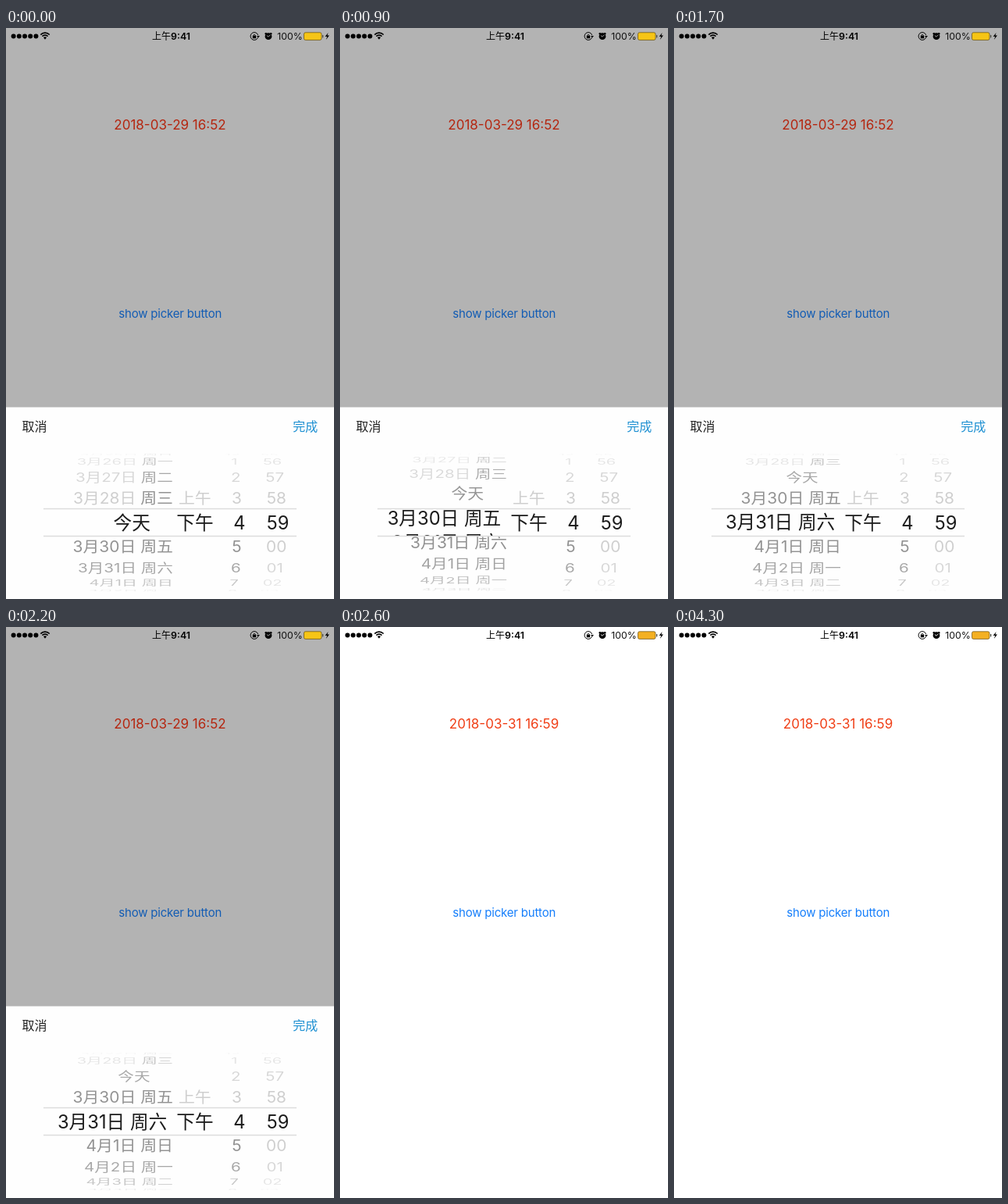
An HTML page with a canvas that plays this animation: 420x731 px, repeating every 4800 ms.

```html
<!DOCTYPE html>
<html lang="zh-CN">
<head>
<meta charset="utf-8">
<title>Date picker</title>
<style>
html, body { margin: 0; width: 100%; height: 100%; overflow: hidden; background: #fff; }
canvas { display: block; }
</style>
</head>
<body>
<canvas id="stage" width="420" height="731"></canvas>
<script>
const c = document.getElementById('stage').getContext('2d');
const W = 420, H = 731, LOOP = 4800;
const FONT = 'Inter, "Noto Sans CJK SC", "Noto Sans CJK", sans-serif';
const RADIUS = 87.3, STEP = 0.363, MID = 633, SHEET = 485.5;
const clamp = v => Math.max(0, Math.min(1, v));

function text(str, x, y, size, color, align = 'center', weight = 400, spacing = 0) {
  c.font = `${weight} ${size}px ${FONT}`;
  c.letterSpacing = spacing + 'px';
  c.textAlign = align;
  c.fillStyle = color;
  c.fillText(str, x, y);
  return c.measureText(str).width;
}

function disc(x, y, r, color = '#000') {
  c.fillStyle = color;
  c.beginPath();
  c.arc(x, y, r, 0, 7);
  c.fill();
}

function arc(x, y, r, from, to, width, color = '#000') {
  c.strokeStyle = color;
  c.lineWidth = width;
  c.beginPath();
  c.arc(x, y, r, from, to);
  c.stroke();
}

function statusBar(dimmed) {
  for (let i = 0; i < 5; i++) disc(9.6 + i * 7.2, 10.5, 3);

  // Wi-Fi
  for (const r of [8, 5]) arc(50, 14.2, r, -2.36, -0.78, 1.7);
  c.fillStyle = '#000';
  c.beginPath();
  c.moveTo(50, 14.8);
  c.arc(50, 14.2, 2.8, -2.36, -0.78);
  c.fill();

  const w = text('上午', 187, 15, 12, '#000', 'left', 500);
  text('9:41', 187 + w, 15, 12.4, '#000', 'left', 600);

  // Rotation lock
  arc(318, 10.5, 4.9, 0.35, 6, 1);
  c.fillStyle = '#000';
  c.fillRect(315.8, 10, 4.4, 3.3);
  arc(318, 10, 1.4, Math.PI, 0, 0.9);
  c.beginPath();
  c.moveTo(321, 10);
  c.lineTo(325, 10);
  c.lineTo(323, 12.4);
  c.fill();

  // Alarm
  disc(336, 10.7, 4.4);
  disc(332.8, 7.2, 1.3);
  disc(339.2, 7.2, 1.3);
  c.strokeStyle = dimmed ? '#b3b3b3' : '#fff';
  c.lineWidth = 0.9;
  c.beginPath();
  c.moveTo(333.8, 9.5);
  c.lineTo(336, 11.3);
  c.lineTo(338.6, 8.6);
  c.stroke();

  text('100%', 347.3, 15, 12.3, '#111', 'left');

  // Battery
  c.fillStyle = dimmed ? '#f6c516' : '#f4b022';
  c.strokeStyle = 'rgba(70,50,0,.65)';
  c.lineWidth = 0.9;
  c.beginPath();
  c.roundRect(381.5, 5.8, 22.5, 9.6, 2);
  c.fill();
  c.stroke();
  c.fillStyle = '#554';
  c.fillRect(405, 9, 1.3, 3.4);
  c.fillStyle = '#000';
  c.beginPath();
  for (const [x, y] of [[412.6, 6], [408.6, 11], [411.2, 11], [409.8, 15], [414, 9.6], [411.4, 9.6]]) c.lineTo(x, y);
  c.fill();
}

// Calls draw(index, alpha) for each row on the visible half of a drum.
function drum(pos, lens, draw) {
  for (let i = Math.ceil(pos - 4.2); i <= pos + 4.2; i++) {
    const a = (i - pos) * STEP, depth = Math.cos(a);
    if (depth < 0.04) continue;
    const k = lens ? 1 : 1 - 0.08 * (1 - depth);
    c.save();
    c.translate(210, MID + RADIUS * Math.sin(a));
    c.scale(k, lens ? 1 : depth);
    c.translate(-210, 0);
    draw(i, lens ? 1 : Math.min(1, 0.05 + depth));
    c.restore();
  }
}

function wheels(day, lens) {
  const size = lens ? 23.7 : 21, base = size * 0.37;
  const ink = (fade, enabled) => lens ? '#1c1c1c' : `rgba(0,0,0,${fade * (enabled ? 0.43 : 0.19)})`;

  drum(day, lens, (d, fade) => {
    if (d === 29) return text('今天', lens ? 185 : 184, base, size, ink(fade, true), 'right');
    const date = new Date(2018, 2, d), right = lens ? 206.3 : 214;
    const w = text(' 周' + '日一二三四五六'[date.getDay()], right, base, size, ink(fade, true), 'right');
    text(`${date.getMonth() + 1}月${date.getDate()}日`, right - w, base, size, ink(fade, d > 29), 'right');
  });
  drum(0, lens, (i, fade) => {
    if (i === 0 || i === -1) text(i ? '上午' : '下午', 242, base, size, ink(fade, !i));
  });
  drum(4, lens, (h, fade) => text(h || 12, lens ? 299 : 296, base, size, ink(fade, h >= 4)));
  drum(59, lens, (m, fade) =>
    text(String(m % 60).padStart(2, '0'), lens ? 348 : 347, base, size, ink(fade, m === 59)));
}

function clipped(bands, draw) {
  c.save();
  c.beginPath();
  for (const [top, bottom] of bands) c.rect(0, top, W, bottom - top);
  c.clip();
  draw();
  c.restore();
}

function sheet(day, shift) {
  c.save();
  c.translate(0, shift);
  c.fillStyle = '#fefefe';
  c.fillRect(0, SHEET, W, H - SHEET);
  text('取消', 20.5, 516, 16, '#222', 'left');
  text('完成', 399.2, 516, 16, '#1e90d2', 'right');
  clipped([[543, 616], [650, 722]], () => wheels(day, false));
  clipped([[616, 650]], () => wheels(day, true));
  c.fillStyle = '#dcdcdc';
  c.fillRect(48, 614.8, 324, 1.5);
  c.fillRect(48, 649.8, 324, 1.5);
  c.restore();
}

// A flick that slows just past the 31st, then settles back on it.
function dayAt(t) {
  if (t <= 1400) return 29 + 2.19 * (1 - (1 - clamp((t - 650) / 750)) ** 1.94);
  return 31 + 0.19 * (1 - clamp((t - 1400) / 400)) ** 2;
}

function render(t) {
  const dimmed = t < 2600;
  c.fillStyle = dimmed ? '#b3b3b3' : '#fff';
  c.fillRect(0, 0, W, H);
  statusBar(dimmed);
  text(t < 2300 ? '2018-03-29 16:52' : '2018-03-31 16:59', 210, 130, 17, dimmed ? '#b5250f' : '#f03e16');
  text('show picker button', 210.2, 371, 15, dimmed ? '#125cb4' : '#157efb', 'center', 400, -0.2);
  if (dimmed) {
    const u = clamp((t - 2240) / 300);
    sheet(dayAt(t), (H - SHEET) * u * u * (3 - 2 * u));
  }
}

function tick() {
  const t = performance.now() % LOOP;
  render(Math.floor(t / 100) * 100);
  requestAnimationFrame(tick);
}
tick();
</script>
</body>
</html>
```
